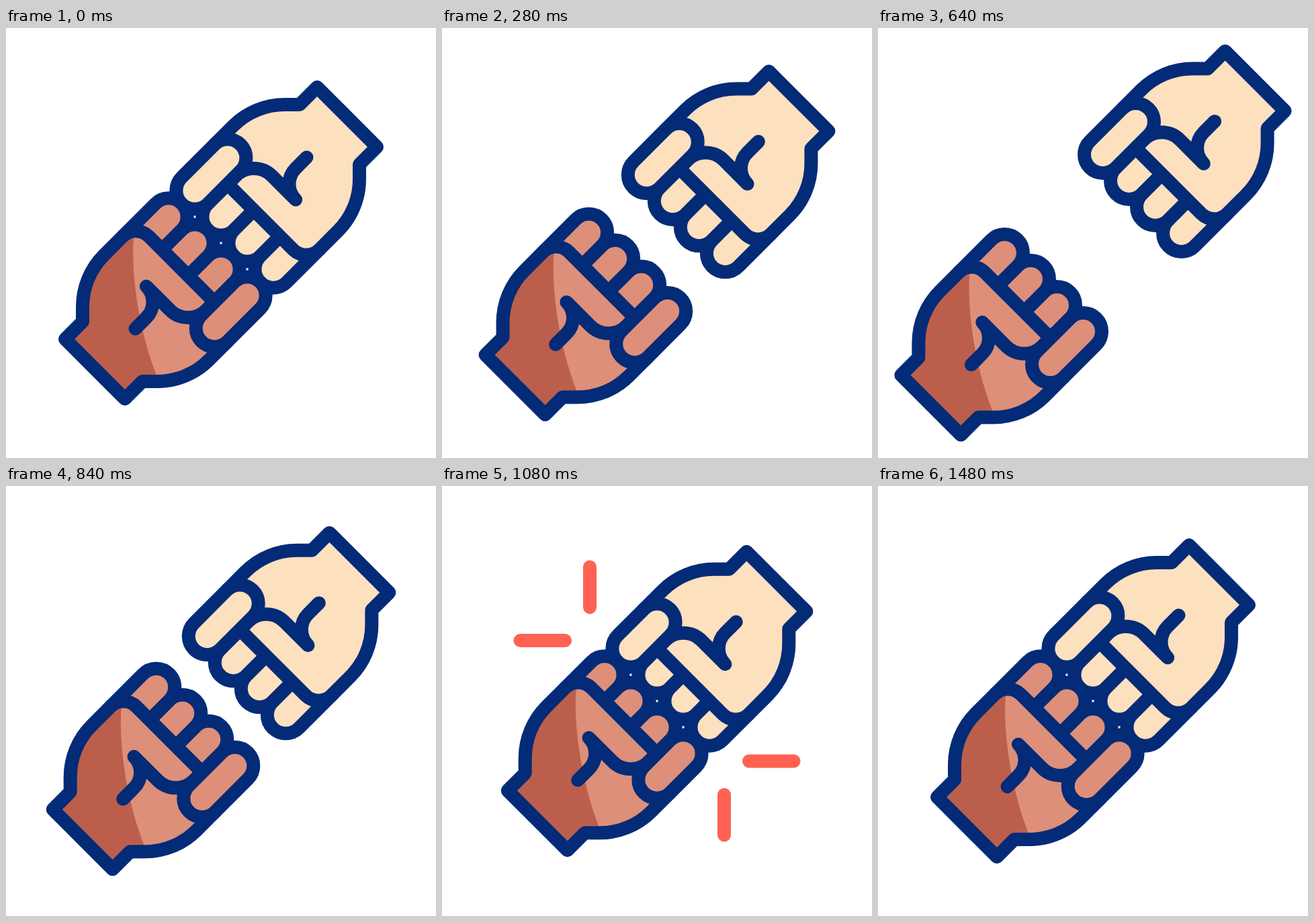
Recreate the animation shown at these times as an HTML page. Size 640 by 640 pixels, loop 1.72 s.

```html
<!DOCTYPE html>
<html lang="en">
<head>
<meta charset="utf-8">
<title>Fist bump</title>
<style>
  html, body { margin: 0; width: 100%; height: 100%; overflow: hidden; background: #fff; }
  svg { display: block; width: 100vw; height: 100vh; }
  .ink { stroke: #032b77; stroke-width: 20; stroke-linejoin: round; stroke-linecap: round; }
  .spark { stroke: #ff6152; stroke-width: 20; stroke-linecap: round; }
</style>
</head>
<body>
<svg id="stage" viewBox="0 0 640 640">
  <g id="hands"></g>
  <g id="sparks"></g>
</svg>
<script>
const NS = 'http://www.w3.org/2000/svg';
const LOOP = 1720, STEP = 40;
const R = 27.6;          // finger radius; fingers are 2R apart
const KNUCKLE = 3.5 * R; // where the first finger folds into the palm

// Hand space: x runs along the arm away from the centre, y across the knuckles.
const WRIST = 'L228.4,-62.9 H265.2 V62.9 H228.4 L212.8,78.5 A108.6,108.6 0 0 1 136,110.4 H96.6';
const PALM = `M69,-55.2 L96.6,-110.4 H136 A108.6,108.6 0 0 1 212.8,-78.5 ${WRIST} A${R},${R} 0 0 1 69,82.8 Z`;
const SHADE = `M85.6,98.3 C126.6,62.9 178.9,-4.9 209.3,-76.4 ${WRIST} Z`;
const THUMB = 'M69,-55.2 H86 A38.2,38.2 0 0 1 124.2,-17 V33 A33,33 0 0 1 157.2,0 H180.3';

function add(parent, tag, attrs) {
  const el = document.createElementNS(NS, tag);
  for (const k in attrs) el.setAttribute(k, attrs[k]);
  parent.appendChild(el);
  return el;
}

function makeHand(turn, skin, shade) {
  const root = add(document.getElementById('hands'), 'g', {
    transform: `translate(320 320) rotate(${turn})`
  });
  const ink = (parent, d, fill) => add(parent, 'path', { class: 'ink', d, fill });
  const fingers = [-1, 1, 3].map(n => ({ y: n * R, el: ink(root, '', skin) }));
  const palm = add(root, 'g', {});
  add(palm, 'path', { d: PALM, fill: skin });
  if (shade) add(palm, 'path', { d: SHADE, fill: shade });
  ink(palm, PALM, 'none');
  ink(palm, THUMB, 'none');
  const first = ink(root, '', skin);

  return (tip, base) => {
    const x = R + tip, end = KNUCKLE + base;
    palm.setAttribute('transform', `translate(${base} 0)`);
    for (const { y, el } of fingers) {
      const stop = y > 2 * R ? end : 69 + base;
      el.setAttribute('d', `M${stop},${y - R} H${x} A${R},${R} 0 0 0 ${x},${y + R} H${stop}`);
    }
    first.setAttribute('d',
      `M${end},${-4 * R} H${x} A${R},${R} 0 0 0 ${x},${-2 * R} H${end} A${R},${R} 0 0 0 ${end},${-4 * R} Z`);
  };
}

const hands = [
  makeHand(-45, '#fde0be'),
  makeHand(135, '#dd8f7a', '#bb5f4c')
];

// Each spark: inner point and the vector to its outer point
const sparks = [
  [220, 180.5, 0, -60], [183, 230, -66.5, 0],
  [420, 459.5, 0, 60], [457, 409.5, 66.5, 0]
].map(([x, y, dx, dy]) => ({
  x, y, dx, dy, el: add(document.getElementById('sparks'), 'line', { class: 'spark' })
}));

const clamp = v => Math.min(1, Math.max(0, v));

// Cubic easing with flat ends and handles at x1, x2
function ease(p, x1, x2) {
  let lo = 0, hi = 1;
  for (let i = 0; i < 24; i++) {
    const s = (lo + hi) / 2, r = 1 - s;
    if (3 * s * r * r * x1 + 3 * s * s * r * x2 + s * s * s < p) lo = s; else hi = s;
  }
  return lo * lo * (3 - 2 * lo);
}

// Start time, end time, from, to, easing handles
const MOVES = [
  [80, 520, 0, 59.2, .54, .47],
  [520, 1080, 59.2, -9.7, .46, .59],
  [1080, 1480, -9.7, 0, .5, .5]
];

function offset(t) {
  for (const [a, b, from, to, x1, x2] of MOVES) {
    if (t < b) return t <= a ? from : from + (to - from) * ease((t - a) / (b - a), x1, x2);
  }
  return 0;
}

function draw(t) {
  const base = offset(t) * Math.SQRT2;
  for (const pose of hands) pose(Math.max(0, base), base);

  const head = ease(clamp((t - 920) / 160), .4, .5);
  const tail = ease(clamp((t - 1080) / 200), .5, .5);
  const on = head > 0.01 && tail < 0.99;
  for (const { x, y, dx, dy, el } of sparks) {
    el.setAttribute('visibility', on ? 'visible' : 'hidden');
    el.setAttribute('x1', x + dx * tail);
    el.setAttribute('y1', y + dy * tail);
    el.setAttribute('x2', x + dx * head);
    el.setAttribute('y2', y + dy * head);
  }
}

const start = performance.now();
function tick() {
  const t = (performance.now() - start) % LOOP;
  draw(Math.floor(t / STEP) * STEP);
  requestAnimationFrame(tick);
}
draw(0);
requestAnimationFrame(tick);
</script>
</body>
</html>
```
